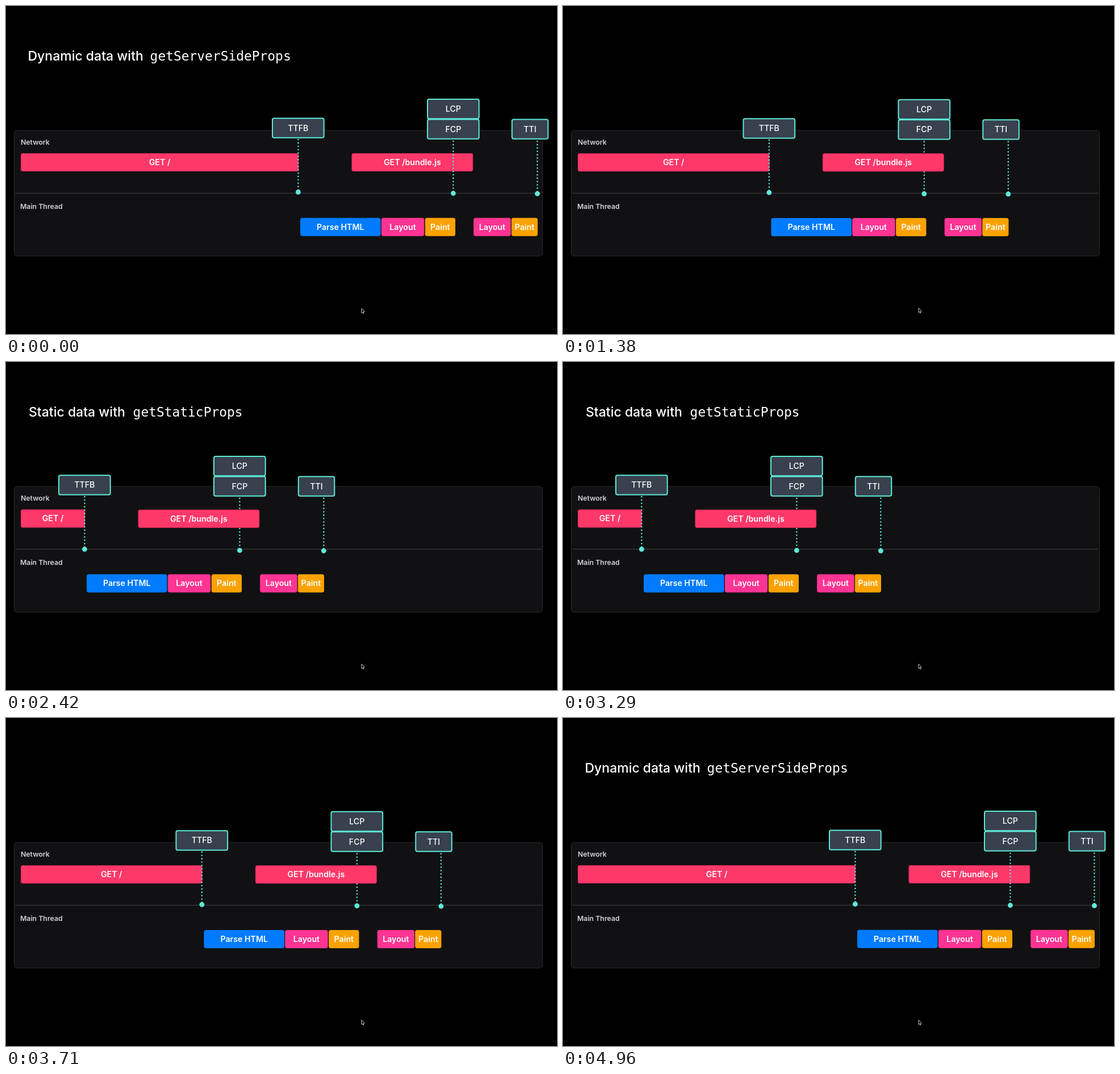
Recreate the animation shown at these times as an HTML page. Size 970 by 577 pixels, loop 5210 ms.

```html
<!DOCTYPE html>
<html lang="en">
<head>
<meta charset="utf-8">
<title>Page load timeline</title>
<style>
  html, body { margin: 0; width: 100%; height: 100%; overflow: hidden; background: #000; }
  svg { display: block; width: 970px; height: 577px; }
  text { font-family: Inter, sans-serif; font-optical-sizing: none; fill: #fff; white-space: pre; }
  .title { font-size: 23px; font-weight: 500; }
  .code { font: 22.9px "DejaVu Sans Mono", monospace; }
  .lane { font-size: 12.3px; font-weight: 600; fill: #d2d2d5; }
  .label { font-size: 14.2px; font-weight: 600; text-anchor: middle; }
  .tag { font-size: 14.2px; font-weight: 500; text-anchor: middle; }
</style>
</head>
<body>
<svg viewBox="0 0 970 577">
  <rect width="970" height="577"/>
  <g id="dynamic">
    <text class="title" x="38.5" y="96">Dynamic data with</text>
    <text class="code" x="253.6" y="96">getServerSideProps</text>
  </g>
  <g id="static">
    <text class="title" x="40" y="96">Static data with</text>
    <text class="code" x="223.6" y="96">getStaticProps</text>
  </g>
  <rect x="14.5" y="218.9" width="930" height="221" rx="5" fill="#111113" stroke="#2b2b2d"/>
  <path d="M17 329.3H943" stroke="#77748f" stroke-dasharray="1 1"/>
  <text class="lane" x="26" y="244">Network</text>
  <text class="lane" x="25" y="356.5">Main Thread</text>
  <g id="stage"></g>
  <path id="cursor" d="M626 532v8l1.8-1.6 1.2 2.6 1.2-.6-1.2-2.5 2.2-.3z" fill="#000" stroke="#ddd" stroke-width=".9"/>
</svg>
<script>
const NS = "http://www.w3.org/2000/svg";
const $ = id => document.getElementById(id);
const LOOP = 5208, STEP = 1000 / 24, MOVE = 300;
const TO_STATIC = 1244.5, TO_DYNAMIC = 3548.5;
const SHIFT = -376, MINT = "#5eead9";

function add(parent, name, attrs, content) {
  const el = document.createElementNS(NS, name);
  for (const key in attrs) el.setAttribute(key, attrs[key]);
  if (content) el.textContent = content;
  return parent.appendChild(el);
}

const stage = $("stage");
const group = () => add(stage, "g", {});

function bar(parent, x, y, width, fill, edge, label) {
  const rect = add(parent, "rect", {
    x: x + .5, y: y + .5, width: width - 1, height: 31, rx: 2.5, fill, stroke: edge
  });
  const text = add(parent, "text", { class: "label", x: x + width / 2, y: y + 21 }, label);
  return { rect, text };
}

function pin(parent, x, top, end) {
  add(parent, "path", {
    d: `M${x} ${top}V${end}`, stroke: MINT, "stroke-width": 2.6,
    "stroke-linecap": "round", "stroke-dasharray": "0 5.9"
  });
  add(parent, "circle", { cx: x, cy: end, r: 4.4, fill: MINT });
}

function tag(parent, x, y, width, label) {
  add(parent, "rect", {
    x: x + 1, y: y + 1, width: width - 2, height: 34.3, rx: 3,
    fill: "#38414d", stroke: MINT, "stroke-width": 2
  });
  add(parent, "text", { class: "tag", x: x + width / 2, y: y + 23.2 }, label);
}

// Paint order: the paint pin sits behind the bundle bar unless the dynamic page is at rest.
const RED = "#ff386a", RED_EDGE = "#e82a5c", PINK = "#ff3493", AMBER = "#fca200";
const backPin = group(), request = group(), bars = group(), frontPin = group(), tags = group();

pin(backPin, 787.4, 238, 329.5);
pin(frontPin, 787.4, 238, 329.5);

const get = bar(request, 26, 259, 489, RED, RED_EDGE, "GET /");
bar(bars, 608.5, 259, 213.7, RED, RED_EDGE, "GET /bundle.js");
[
  [518, 141.5, "#007bff", "Parse HTML"],
  [660.8, 75.4, PINK, "Layout"],
  [737.7, 53.3, AMBER, "Paint"],
  [823.2, 65.4, PINK, "Layout"],
  [889.8, 46.2, AMBER, "Paint"]
].forEach(([x, width, fill, label]) => bar(bars, x, 372.7, width, fill, fill, label));

pin(tags, 514.4, 235, 327.4);
pin(tags, 935.4, 238, 330.2);
tag(tags, 468, 196.4, 92.7, "TTFB");
tag(tags, 741, 163, 92.7, "LCP");
tag(tags, 741, 198.5, 92.7, "FCP");
tag(tags, 889.8, 198.5, 65.5, "TTI");

function ease(t, start) {
  const u = Math.min(1, Math.max(0, (t - start) / MOVE));
  return u * u * (3 - 2 * u);
}

const place = (el, x, y) => el.setAttribute("transform", `translate(${x} ${y})`);
const show = (el, on) => el.setAttribute("visibility", on ? "visible" : "hidden");

function draw(time) {
  const t = Math.floor((time % LOOP + 5) / STEP) * STEP;
  const p = ease(t, TO_STATIC) - ease(t, TO_DYNAMIC);
  const dx = SHIFT * p;
  const resting = p < .005;

  for (const el of [backPin, frontPin, tags]) place(el, dx, 1.9 * p);
  place(bars, dx, .7 * p);
  place(request, 0, .4 * p);
  get.rect.setAttribute("width", 488 + dx);
  get.text.setAttribute("x", 270.5 + dx / 2);

  show($("dynamic"), resting);
  show($("static"), p > .995);
  show(frontPin, resting);
  show(backPin, !resting);
  place($("cursor"), 0, t > TO_STATIC + 10 ? -.7 : 0);
}

const begin = performance.now();
function tick() {
  draw(performance.now() - begin);
  requestAnimationFrame(tick);
}
draw(0);
requestAnimationFrame(tick);
</script>
</body>
</html>
```
